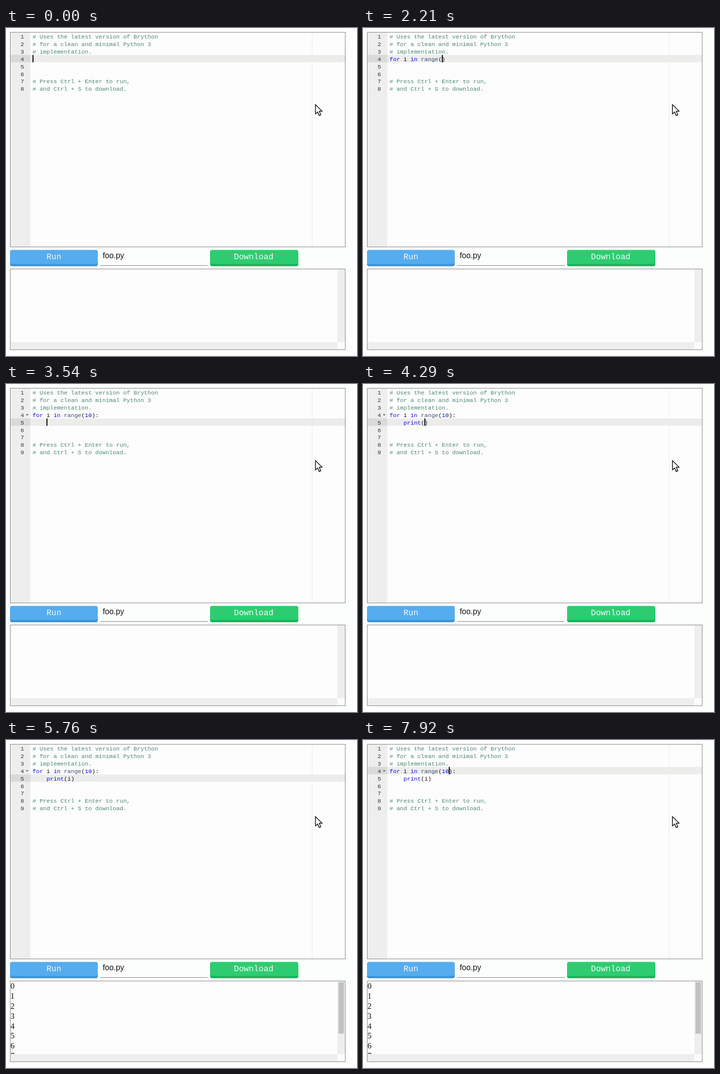
An HTML page that plays this animation: 700x654 px, repeating every 8 s.

```html
<!DOCTYPE html>
<html lang="en">
<head>
<meta charset="utf-8">
<title>Python editor</title>
<style>
html, body { margin: 0; width: 100%; height: 100%; overflow: hidden; background: #fcfefd; }
svg { display: block; width: 100vw; height: 100vh; }
text { white-space: pre; }
.code { font: 11.59px "Liberation Mono", monospace; fill: #111; }
.gutter { text-anchor: end; fill: #333; }
.comment { fill: #4c886b; }
.keyword { fill: #1010e0; }
.builtin { fill: #3c4c72; }
.number { fill: #0000cd; }
.button { font: 16.45px "Liberation Mono", monospace; fill: #f4fbff; text-anchor: middle; }
.file { font: 15.6px "Liberation Sans", sans-serif; fill: #111; }
.output { font: 16px "Liberation Serif", serif; fill: #111; }
.frame { fill: none; stroke: #858585; }
</style>
</head>
<body>
<svg viewBox="0 0 700 654">
  <rect x="8" y="8" width="669" height="429" fill="#fdfdfd"/>
  <rect x="9" y="9" width="39.5" height="427" fill="#eeeeee"/>
  <rect id="activeLine" x="48.5" width="628" height="14.7" fill="#ecedeb"/>
  <rect id="activeGutter" x="9" width="39.5" height="14.7" fill="#dadada"/>
  <path d="M610.5 9V436" stroke="#e9ebea"/>
  <g id="lines"></g>
  <path id="fold" d="M39.4 60.2h5.6l-2.8 3z" fill="#666"/>
  <rect id="caret" width="2" height="14.7" fill="#000"/>
  <rect class="frame" x="8.5" y="8.5" width="668" height="428"/>

  <rect x="8" y="448" width="175" height="27" rx="4" fill="#3c93d5"/>
  <rect x="8" y="442.5" width="175" height="28" rx="4" fill="#55acee"/>
  <text class="button" x="95.5" y="461.3">Run</text>
  <text class="file" x="193" y="459.2">foo.py</text>
  <path d="M188 473.5H402" stroke="#808080"/>
  <rect x="407" y="448" width="176" height="27" rx="4" fill="#19b45b"/>
  <rect x="407" y="442.5" width="176" height="28" rx="4" fill="#2ecc71"/>
  <text class="button" x="494" y="461.3">Download</text>

  <rect x="8" y="480" width="669" height="162" fill="#fdfdfd"/>
  <clipPath id="view"><rect x="9" y="481" width="652" height="145.5"/></clipPath>
  <g id="result">
    <g id="output" class="output" clip-path="url(#view)"></g>
  </g>
  <rect x="661" y="481" width="15" height="145.5" fill="#eeeeee"/>
  <rect x="9" y="626.5" width="652" height="14.5" fill="#eeeeee"/>
  <rect id="thumb" x="663" y="483" width="11" height="102.5" fill="#c1c1c1"/>
  <rect class="frame" x="8.5" y="480.5" width="668" height="161"/>
  <path d="M617.2 152.8V171.3L621.5 167.4L624.6 174.4L627.8 173L624.8 166.2L630.3 165.8Z"
        fill="#fff" stroke="#111" stroke-width="1.5"/>
</svg>
<script>
const LOOP = 8000, CHAR = 6.955, ROW = 14.9, LEFT = 53, TOP = 9;
const RUN_AT = 5760, FOLD_AT = 3200;
const HEAD = ["# Uses the latest version of Brython",
              "# for a clean and minimal Python 3",
              "# implementation."];
const TAIL = ["", "", "# Press Ctrl + Enter to run,", "# and Ctrl + S to download."];
const LOOP_LINE = "for i in range(10):";
const $ = id => document.getElementById(id);

// Edits to each line: [time, text]
const firstLine = [
  [0, ""], [100, "f"], [240, "for"], [390, "for "], [530, "for i"],
  [930, "for i "], [1100, "for i in"], [1270, "for i in "], [1440, "for i in r"],
  [1620, "for i in ra"], [1790, "for i in rang"], [1960, "for i in range"],
  [2210, "for i in range()"], [2510, "for i in range(1)"],
  [2740, "for i in range(10)"], [3200, LOOP_LINE]
];
const secondLine = [
  [0, null], [3540, "    "], [3730, "    p"], [3910, "    pri"],
  [4100, "    print"], [4290, "    print()"], [4620, "    print(i)"]
];
// Caret moves without edits: [time, row, column]; column -1 hides it
const moves = [
  [3070, 3, 18], [5030, 4, 12], [5760, 4, -1], [6140, 4, 12], [6750, 4, -1],
  [7010, 3, 12], [7360, 3, 19], [7510, 3, 18], [7920, 3, 17]
];

const latest = (steps, t) => steps.filter(s => s[0] <= t).pop();
const typed = (steps, row) => steps.filter(s => s[1] !== null)
  .map(([t, s]) => [t, row, s.endsWith(")") ? s.length - 1 : s.length]);
const caretSteps = [...typed(firstLine, 3), ...typed(secondLine, 4), ...moves]
  .sort((a, b) => a[0] - b[0]);

function highlight(line) {
  if (line.startsWith("#")) return `<tspan class="comment">${line}</tspan>`;
  return line.replace(/\b(for|in|print)\b|\b(range)\b|\b(\d+)\b/g, (word, key, fn) =>
    `<tspan class="${key ? "keyword" : fn ? "builtin" : "number"}">${word}</tspan>`);
}

function drawLines(lines) {
  $("lines").innerHTML = lines.map((line, i) => {
    const y = TOP + 12 + i * ROW;
    return `<text class="code gutter" x="36" y="${y}">${i + 1}</text>` +
           `<text class="code" x="${LEFT}" y="${y}">${highlight(line)}</text>`;
  }).join("");
}

function show(id, visible) {
  $(id).setAttribute("visibility", visible ? "visible" : "hidden");
}

let shown = "";
function draw(t) {
  const body = latest(secondLine, t)[1];
  const lines = [...HEAD, latest(firstLine, t)[1], ...(body === null ? [] : [body]), ...TAIL];
  const key = lines.join("\n");
  if (key !== shown) drawLines(lines);
  shown = key;

  const [, row, column] = latest(caretSteps, t);
  const y = TOP + row * ROW;
  for (const id of ["activeLine", "activeGutter", "caret"]) $(id).setAttribute("y", y);
  $("caret").setAttribute("x", LEFT - 0.2 + Math.max(column, 0) * CHAR);
  show("caret", column >= 0);
  show("fold", t >= FOLD_AT);
  show("result", t >= RUN_AT);
  show("thumb", t >= RUN_AT);
}

$("output").innerHTML = Array.from({ length: 10 }, (_, i) =>
  `<text x="9" y="${496.2 + i * 19.85}">${i}</text>`).join("");

const start = performance.now();
function tick() {
  draw((performance.now() - start) % LOOP);
  requestAnimationFrame(tick);
}
tick();
</script>
</body>
</html>
```
